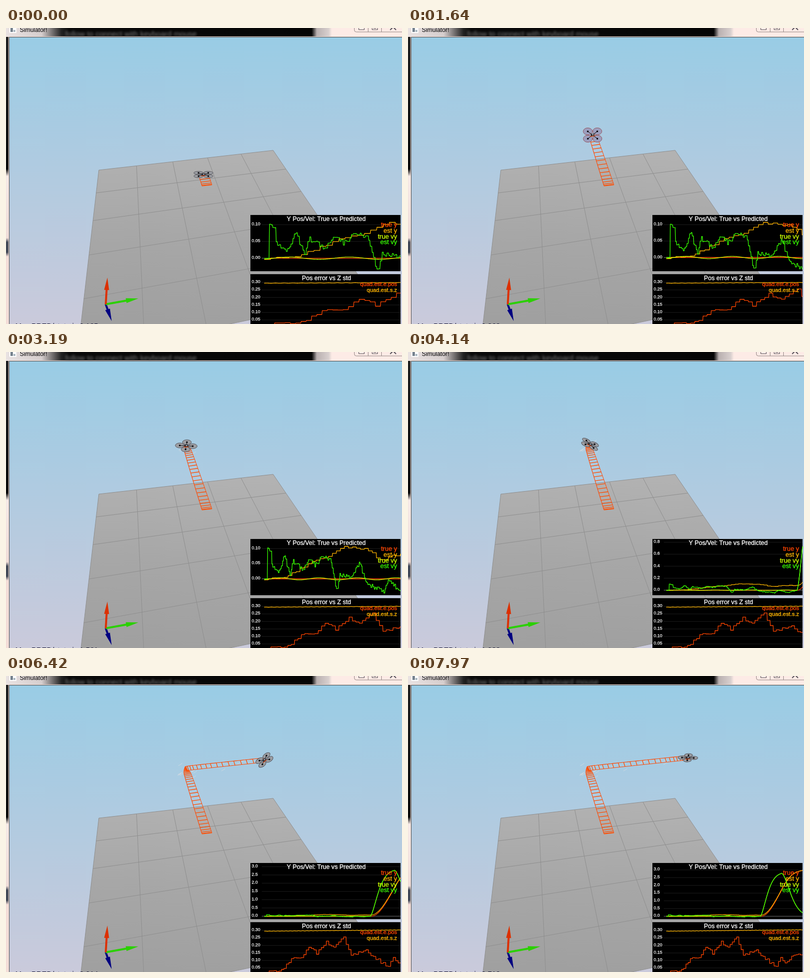
An HTML page with a canvas that plays this animation: 802 by 600 pixels, repeating every 8 s.

```html
<!DOCTYPE html>
<html lang="en">
<head>
<meta charset="utf-8">
<title>Simulator!</title>
<style>
html, body { margin: 0; width: 100%; height: 100%; overflow: hidden; }
canvas { display: block; }
</style>
</head>
<body>
<canvas id="stage" width="802" height="600"></canvas>
<script>
const ctx = document.getElementById('stage').getContext('2d');
const LOOP = 8, ELAPSED = 5.7, DT = 0.02, TAKEOFF = -.8;
const RED = '#ff4500', AMBER = '#ffb400', LIME = '#ccff00', GREEN = '#37ff00';

const clamp = u => Math.max(0, Math.min(1, u));
const mix = (a, b, u) => a + (b - a) * u;
const smooth = u => (u = clamp(u), u * u * (3 - 2 * u));
const hash = n => { const s = Math.sin(n * 127.1 + 3.7) * 43758.5453; return s - Math.floor(s); };

// Value between [x, y] key points
function at(keys, x) {
  let i = 1;
  while (i < keys.length - 1 && keys[i][0] < x) i++;
  const [x0, y0] = keys[i - 1], [x1, y1] = keys[i];
  return mix(y0, y1, clamp((x - x0) / (x1 - x0)));
}
// The same as a noisy staircase, as a sensor with a fixed period sees it
function staircase(keys, x, period, noise) {
  const k = Math.floor(x / period);
  return at(keys, k * period) + (hash(k) - .5) * noise;
}

// Sideways dash: quick rise, then a soft stop
function dashSpeed(s) {
  const rise = 1 - Math.exp(-Math.pow(Math.max(0, s - 9.42) / .9, 1.5));
  const fall = Math.exp(-Math.pow(Math.max(0, s - 11.55) / 1.17, 1.6));
  return 2.85 * rise * fall;
}
const driftV = [[.18, 0], [.21, .1], [.42, .098], [.45, .055], [.9, .015], [1.3, .075], [1.7, .01], [1.86, .06],
  [2.5, .03], [3, .068], [3.3, .045], [3.8, .075], [4.3, .06], [4.65, -.028], [4.8, -.028], [4.86, .015],
  [5.6, .005], [6.2, .055], [6.6, -.015], [7.8, -.043], [8.1, 0], [8.7, -.04], [9.4, 0]];
const driftY = [[.9, 0], [5.4, .107], [6.6, .096], [7.7, .06], [8.6, .08], [10, .08], [12.5, .01]];
const driftError = [[0, .015], [1.6, .045], [2.4, .105], [3.2, .115], [3.9, .185], [4.6, .15], [5.6, .23], [5.8, .18],
  [7.1, .25], [7.6, .14], [9, .165], [10.9, .06], [11.4, .115], [11.8, .08], [13, .145], [13.6, .12]];

const data = { trueY: [], estY: [], trueV: [], estV: [], error: [], zStd: [] };
for (let s = 0, y = 0; s <= ELAPSED + LOOP; s += DT) {
  const v = dashSpeed(s);
  y += v * DT * .445;
  data.trueY.push(y);
  data.estY.push(y + staircase(driftY, s, .26, .01));
  data.trueV.push(v + .0035 * Math.sin(s * 2.5 - 1));
  data.estV.push(v + staircase(driftV, s, .07, s > .2 && s < 9.4 ? .014 : 0));
  data.error.push(staircase(driftError, s, .22, .022));
  data.zStd.push(.295 + .0007 * s + .0008 * Math.sin(s * 17));
}

// Flight: a climb along a straight line, then the dash to the right
const yawKeys = [[1.64, .78], [3.2, .1], [4.14, .7], [6.42, .75], [8, .1]];
const squashKeys = [[0, .33], [1.64, .77], [3.2, .55], [4.14, .42], [5.1, .45], [6.42, .55], [8, .42]];
const tiltKeys = [[3.2, 0], [4.14, .45], [5.1, .1], [6.42, -.6], [8, 0]];

function position(t) {
  const sample = Math.round((t + ELAPSED) / DT);
  const travelled = data.trueY[Math.min(sample, data.trueY.length - 1)];
  const below = Math.exp(-Math.pow((t - TAKEOFF) / 1.98, 1.88));
  return { x: 364 + 43 * below + 68.5 * travelled, y: 187 + 132 * below - 7.2 * travelled, below };
}

function path(points, color, width = 1) {
  ctx.beginPath();
  points.forEach(([x, y]) => ctx.lineTo(x, y));
  ctx.strokeStyle = color; ctx.lineWidth = width; ctx.stroke();
}
function shape(points, color) {
  ctx.beginPath();
  points.forEach(([x, y]) => ctx.lineTo(x, y));
  ctx.fillStyle = color; ctx.fill();
}
function box(x, y, w, h, color) { ctx.fillStyle = color; ctx.fillRect(x, y, w, h); }
function gradient(x0, y0, x1, y1, stops) {
  const g = ctx.createLinearGradient(x0, y0, x1, y1);
  stops.forEach(([offset, color]) => g.addColorStop(offset, color));
  return g;
}
function label(text, x, y, size, color, align = 'left', weight = 0) {
  ctx.font = size + 'px "Liberation Sans", Arial, sans-serif';
  ctx.textAlign = align; ctx.fillStyle = ctx.strokeStyle = color;
  ctx.fillText(text, x, y);
  if (weight) { ctx.lineWidth = weight; ctx.strokeText(text, x, y); }
}

function drawWindow() {
  box(0, 0, 802, 600, '#fcebe6');
  box(0, 0, 802, 17, gradient(0, 0, 802, 0, [[0, '#e9e2e2'], [.09, '#d5cdcd'], [.14, '#222'], [.16, '#0a0a0a'],
    [.772, '#050505'], [.785, '#b9b0b0'], [.815, '#d8cfce'], [.823, '#fdebe6']]));
  ctx.filter = 'blur(2px)';
  label('follow to connect with keyboard mouse', 120, 17, 15.5, '#777');
  ctx.filter = 'none';
  box(0, 18, 5, 582, gradient(0, 18, 0, 600, [[0, '#222'], [.46, '#0a0a0a'], [.485, '#f5e9e6'], [.7, '#efdcd8'],
    [.715, '#434a58'], [.75, '#434a58'], [.765, '#f3dcd7']]));
  box(6, 18, 796, 582, '#454545');
  box(7, 0, 14, 10, '#fff');
  box(9, 0, 5, 8, '#75818d');
  box(15, 4, 4, 4, '#a9b6bf');
  label('Simulator!', 28, 8, 12.3, '#000');
  ctx.strokeStyle = '#8f8583'; ctx.lineWidth = 1;
  ctx.beginPath(); ctx.roundRect(705.5, -10, 110, 18, 4); ctx.stroke();
  for (const x of [733.5, 760.5]) path([[x, 0], [x, 8]], '#8f8583');
  ctx.strokeStyle = '#55525a';
  for (const x of [714.5, 741.5]) ctx.strokeRect(x, -4.5, 11, 8);
  ctx.strokeRect(744.5, -2.5, 5, 3);
  path([[778, 4], [784, -2], [790, 4]], '#55525a', 2);
}

// Perspective floor; one unit of u and v is five columns and three rows
function floorPoint(u, v) {
  const w = 1 + .1042 * u - .2651 * v;
  return [(188 + 409.4 * u - 64.5 * v) / w, (288 - 14.2 * u + 50.1 * v) / w];
}
function arrow(length, angle, color) {
  ctx.save();
  ctx.translate(202, 560); ctx.rotate(angle);
  box(0, -2, length - 20, 4, color);
  shape([[length - 25, -5], [length - 25, 5], [length, 0]], color);
  ctx.restore();
}
function drawWorld() {
  box(7, 19, 795, 581, gradient(0, 19, 0, 600, [[0, '#99cce5'], [.5, '#b2cbe0'], [1, '#cacadb']]));
  const far = 5 / 3;
  shape([floorPoint(0, 0), floorPoint(1, 0), floorPoint(1, far), floorPoint(0, far)],
    gradient(400, 250, 380, 600, [[0, '#b2b2b2'], [.5, '#a7a7a7'], [1, '#a0a0a0']]));
  for (let i = 0; i <= 5; i++) {
    path([floorPoint(i / 5, 0), floorPoint(i / 5, far)], '#8f8f8f');
    path([floorPoint(0, i / 3), floorPoint(1, i / 3)], '#8f8f8f');
  }
  arrow(36, 1.23, '#000080');
  arrow(67, -.175, '#2bd000');
  arrow(54, -1.51, '#dc3000');
}

function rung(t) {
  const { x, y, below } = position(t), turn = smooth((t - 2.4) / 1.6);
  const wx = mix(5.5 + 4.5 * Math.sqrt(below), 1.4, turn), wy = mix(-1.2, 4.3, turn);
  return [[x - wx, y - wy], [x + wx, y + wy]];
}
function drawTrail(t) {
  // Faint marks left by the spinning rotors
  for (let s = 2.2; s < Math.min(t - .2, 6.7); s += .2) {
    if (s > 4.1 && s < 6 && hash(s) < .7) continue;
    const { x, y } = position(s), dx = 13 * (hash(s) < .5 ? -1 : 1), dy = (hash(s + 1) - .4) * 20;
    path([[x + dx - 4, y + dy + 2], [x + dx, y + dy], [x + dx + 4, y + dy - 3]], 'rgba(232,226,226,.55)');
  }
  const rungs = [];
  for (let s = TAKEOFF; s < t; s += .05) rungs.push(rung(s));
  path(rungs.map(r => r[0]), RED, 1.1);
  path(rungs.map(r => r[1]), RED);
  rungs.filter((_, i) => i % 3 === 0).forEach(r => path(r, '#ff4d00', 1.3));
}

function drawDrone(t) {
  const { x, y } = position(t), squash = at(squashKeys, t), reach = 14 - .25 * t;
  const facing = clamp((squash - .55) / .2);
  const rotors = [0, 1, 2, 3].map(i => {
    const angle = at(yawKeys, t) + i * Math.PI / 2;
    return [reach * Math.cos(angle), reach * squash * Math.sin(angle)];
  });
  ctx.save();
  ctx.translate(x, y); ctx.rotate(at(tiltKeys, t));
  for (const [rx, ry] of rotors) {
    ctx.beginPath();
    ctx.ellipse(rx, ry, reach * .68, reach * .68 * squash, 0, 0, 7);
    ctx.fillStyle = `rgb(156,158,${mix(163, 190, facing)})`; ctx.fill();
    ctx.strokeStyle = `rgb(${mix(85, 150, facing)},85,92)`; ctx.lineWidth = 1; ctx.stroke();
  }
  for (const [rx, ry] of rotors) {
    path([[0, 0], [rx, ry]], '#34343a', 1.2);
    box(rx - 1.5, ry - 1.5, 3, 3, '#08080c');
  }
  box(-3.5, -2.5, 7, 5, '#25252b');
  box(-1, -1.5, 3, 2, '#b8bcc8');
  path([[-5, 3], [4, 2]], RED);
  ctx.restore();
}

function plot(values, count, toY, color) {
  path(values.slice(0, count).map((v, i) => [523 + 276 * i / (count - 1), toY(v)]), color, 1.3);
}
function grid(step, digits, toY, top, bottom) {
  for (let k = 0; k < 12; k++) {
    const y = toY(k * step);
    if (y < top + 5 || y > bottom) continue;
    path([[518, y], [799, y]], k ? '#1d1d1d' : '#777');
    label((k * step).toFixed(digits), 497.5, y + 1.3, 9, '#fff', 'left', .25);
  }
}
function legend(names, size) {
  return ([text, color], i) => label(text, 792, names + i * 11.8, size, color, 'right', .35);
}

function drawCharts(t) {
  const count = Math.min(data.error.length, Math.floor((t + ELAPSED) / DT));
  const curves = [['true y', RED, data.trueY], ['est y', AMBER, data.estY], ['true vy', LIME, data.trueV], ['est vy', GREEN, data.estV]];
  const seen = curves.flatMap(c => c[2].slice(0, count));
  const low = Math.min(...seen), range = Math.max(...seen) - low;
  const toY = v => 488.5 - (v - low) / range * 94.5;
  const step = range < .3 ? .05 : range < .6 ? .1 : range < 1.2 ? .2 : .5;

  box(495, 379, 304, 114, '#000');
  grid(step, step < .1 ? 2 : 1, toY, 379, 493);
  curves.forEach(([, color, values]) => plot(values, count, toY, color));
  label('Y Pos/Vel: True vs Predicted', 648.5, 391, 12.6, '#fff', 'center', .35);
  curves.forEach(legend(403, 13));

  const errorY = v => 607 - v * 304;
  box(495, 499, 304, 101, '#000');
  grid(.05, 2, errorY, 499, 600);
  plot(data.error, count, errorY, RED);
  plot(data.zStd, count, errorY, AMBER);
  label('Pos error vs Z std', 649, 511, 12.6, '#fff', 'center', .35);
  [['quad.est.e.pos', RED], ['quad.est.s.z', AMBER]].forEach(legend(523, 11.4));
}

function frame(now) {
  const t = now / 1000 % LOOP;
  drawWindow();
  drawWorld();
  drawTrail(t);
  drawDrone(t);
  label('Max PRED/state is ' + (t * .45 + .125).toFixed(3), 19, 609, 15, '#101030');
  drawCharts(t);
  requestAnimationFrame(frame);
}
requestAnimationFrame(frame);
</script>
</body>
</html>
```
